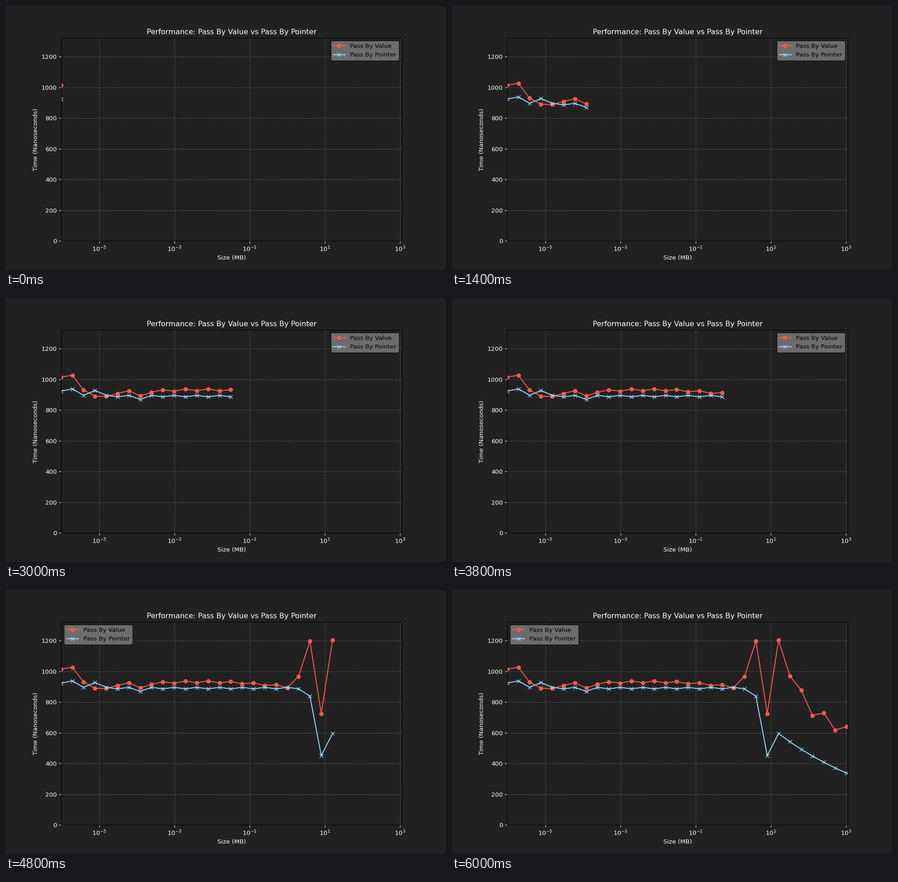
Recreate the animation shown at these times as a matplotlib script. Size 966 px wide and 580 px high, loop 6.2 s.

```python
import matplotlib.pyplot as plt
import numpy as np
from matplotlib.animation import FuncAnimation
from matplotlib.ticker import LogFormatterSciNotation, NullLocator

WIDTH, HEIGHT, DPI = 966, 580, 96
BG = "#212121"
STEP_MS = 200
TAIL = 24  # step of the last peak, where the legend has to make room

step = np.arange(31)
size = 2.0 ** (step - 20)
zigzag = (-1.0) ** step
k = np.clip(step - TAIL, 0, None)


def curve(plateau, tail, peaks):
    """Plateau, then a falling tail, with a few single points set apart."""
    y = np.where(step < TAIL, plateau, tail)
    for i, value in peaks.items():
        y[i] = value
    return y


flutter = 40 * np.sin(np.pi * k / 7) * zigzag
by_value = curve(932 - 0.55 * (step - 12.3) ** 2 - 6 * zigzag,
                 570 + 633 * 0.66 ** k + flutter,
                 {0: 1014, 1: 1027, 2: 930, 6: 926, 7: 892,
                  21: 968, 22: 1198, 23: 725})
by_pointer = curve(891 + 5 * zigzag,
                   595 * 0.91 ** k,
                   {0: 923, 1: 938, 3: 927, 7: 869, 22: 838, 23: 452})

plt.rcParams["font.family"] = "DejaVu Sans"
fig, ax = plt.subplots(figsize=(WIDTH / DPI, HEIGHT / DPI), dpi=DPI,
                       facecolor=BG)
ax.set_facecolor(BG)
ax.set_xscale("log")
ax.set_xlim(size[0], size[-1] * 1.1)
ax.set_ylim(0, by_value.max() * 1.1)
ax.set_xticks(10.0 ** np.arange(-5, 4, 2))
ax.xaxis.set_major_formatter(LogFormatterSciNotation())
ax.xaxis.set_minor_locator(NullLocator())
ax.tick_params(colors="white")
ax.grid(True, linestyle="--", color="gray", alpha=0.5)
ax.set_title("Performance: Pass By Value vs Pass By Pointer", color="white")
ax.set_xlabel("Size (MB)", color="white")
ax.set_ylabel("Time (Nanoseconds)", color="white")

value_line, = ax.plot([], [], "o-", color="#ff584d", label="Pass By Value")
pointer_line, = ax.plot([], [], "x-", color="#99d9ff", label="Pass By Pointer")
legend = ax.legend(loc="upper right", facecolor="gray", edgecolor="black",
                   labelcolor="black", framealpha=0.8)


def update(i):
    value_line.set_data(size[:i + 1], by_value[:i + 1])
    pointer_line.set_data(size[:i + 1], by_pointer[:i + 1])
    legend.set_loc("upper right" if i < TAIL else "upper left")
    return value_line, pointer_line, legend


anim = FuncAnimation(fig, update, frames=len(step), interval=STEP_MS,
                     repeat=True, repeat_delay=0, blit=False)
plt.show()
```
